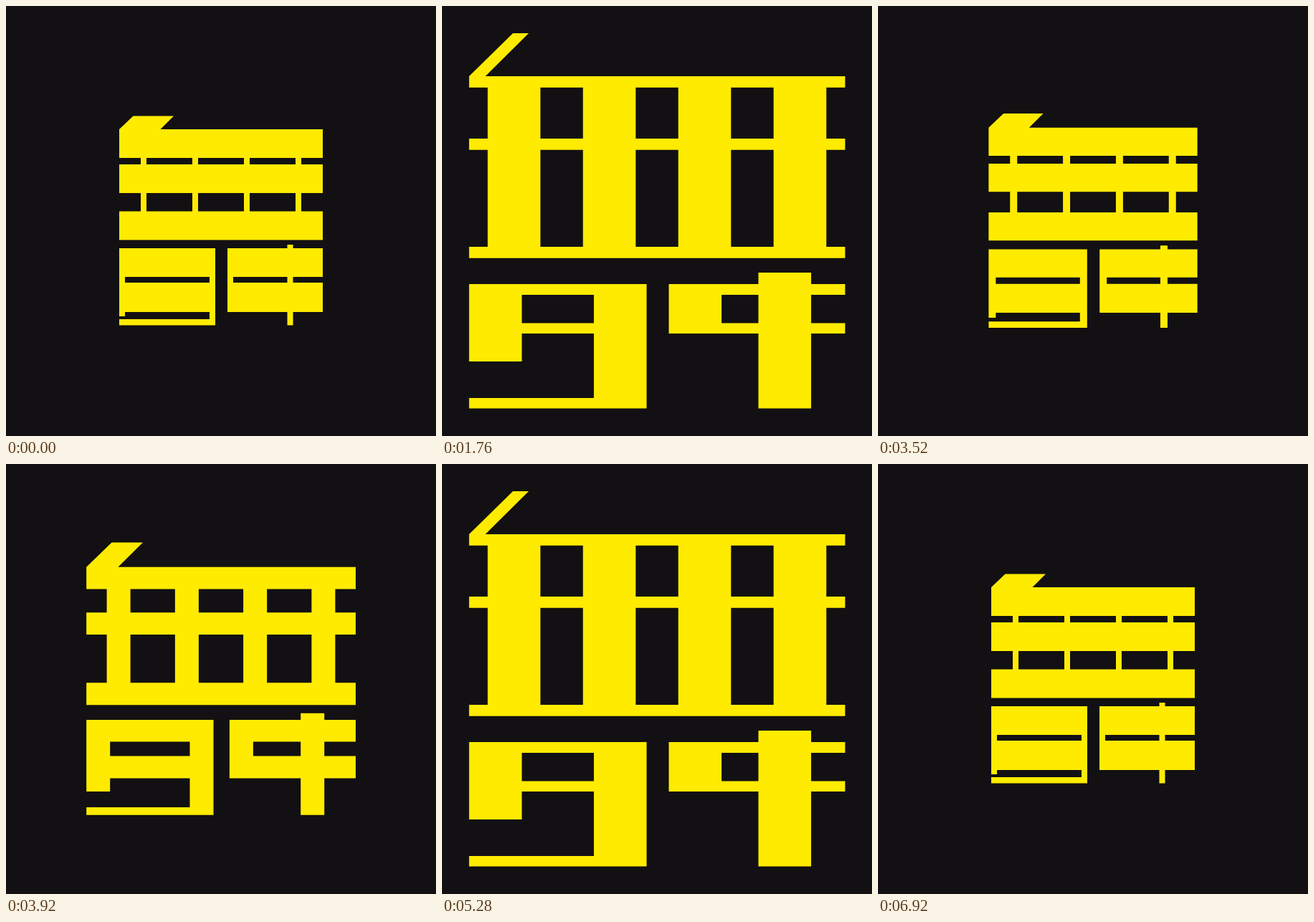
Recreate the animation shown at these times as an HTML page with a canvas. Size 600 by 600 pixels, loop 7 s.

```html
<!DOCTYPE html>
<html lang="en">
<head>
<meta charset="utf-8">
<title>Breathing glyph</title>
<style>
  html, body { margin: 0; height: 100%; overflow: hidden; background: #121012; }
  canvas { display: block; }
</style>
</head>
<body>
<canvas id="stage" width="600" height="600"></canvas>
<script>
const ctx = document.getElementById('stage').getContext('2d');
const LOOP = 7000, LOW = -.02, HIGH = 1.03;

function ease(t, start, duration) {
  const x = Math.min(1, Math.max(0, (t - start) / duration));
  return x < .5 ? 4 * x ** 3 : 1 - 4 * (1 - x) ** 3;
}

// Two breaths per loop, resting at 0 (compact) and swelling to about 1
function sizeAt(t) {
  const breath = ease(t, -255, 1550) - ease(t, 1439, 1669)
    + ease(t, 3121, 1750) - ease(t, 4975, 1586)
    + ease(t, LOOP - 255, 1550);
  return Math.max(0, LOW + (HIGH - LOW) * breath);
}

function draw(p) {
  const mix = (a, b) => a + (b - a) * p;
  const box = (l, t, r, b) => ctx.rect(l, t, r - l, b - t);

  ctx.fillStyle = '#121012';
  ctx.fillRect(0, 0, 600, 600);
  ctx.fillStyle = '#ffeb00';
  ctx.beginPath();

  const left = mix(158, 37.8), right = mix(442, 562.5);
  const stem = mix(8, 73.6), bar = mix(40, 15.8);
  const top = mix(172, 98), base = mix(286.5, 336);

  // Upper part: flag, three bars, four stems
  const tip = mix(153.5, 38);
  ctx.moveTo(left, top);
  ctx.lineTo(mix(177.5, 99), tip);
  ctx.lineTo(mix(234, 121), tip);
  ctx.lineTo(mix(215.5, 60.5), top);
  ctx.closePath();
  for (const y of [top, mix(221, 185), base]) box(left, y, right, y + bar);
  for (let i = 0; i < 4; i++) {
    const x = mix(188 + 72 * i, 63.7 + 133 * i);
    box(x, top, x + stem, base + bar);
  }

  // Lower part: two halves sharing two rows, then the uprights
  const row1 = mix(338, 388), row2 = mix(386, 442.5), row2End = mix(427, 457);
  const leftEnd = mix(292, 285.5), rightStart = mix(309, 316.5);
  const post = mix(392.5, 441.5), foot = mix(445.5, 561.5);
  for (const [l, r] of [[left, leftEnd], [rightStart, right]]) {
    box(l, row1, r, mix(378, 403));
    box(l, row2, r, row2End);
  }
  box(left, row1, left + stem, mix(433, 496));
  box(leftEnd - stem, row1, leftEnd, foot);
  box(left, mix(437, 547), leftEnd, foot);
  box(rightStart, row1, rightStart + stem, row2End);
  box(post, mix(333, 372), post + stem, foot);
  ctx.fill();
}

function frame() {
  draw(sizeAt(performance.now() % LOOP));
  requestAnimationFrame(frame);
}
frame();
</script>
</body>
</html>
```
